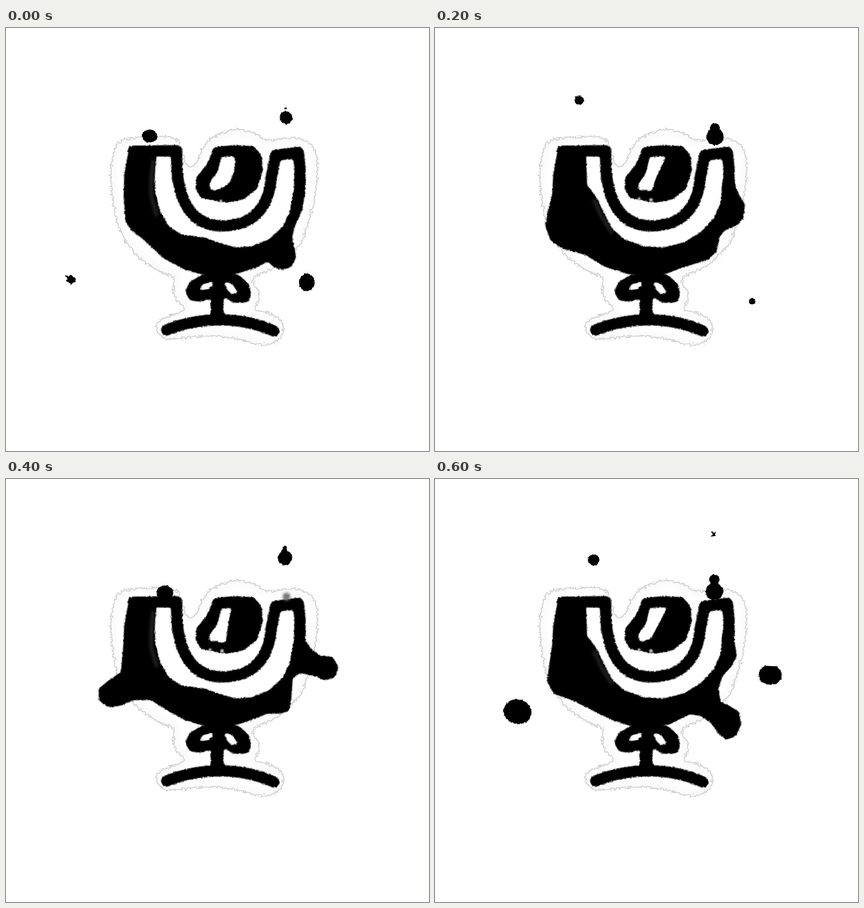
An HTML page without scripts for the animation above (0.8 s loop, 748x748 px).

```html
<!DOCTYPE html>
<html lang="en">
<head>
<meta charset="utf-8">
<title>Splashing cup</title>
<style>
  html, body { margin: 0; width: 100%; height: 100%; overflow: hidden; background: #fff; }
  svg { display: block; width: 100%; height: 100%; }
  .ink { filter: url(#ink); stroke: #000; stroke-width: 2; stroke-linejoin: round; }
  .drops { filter: url(#drop); stroke: #000; stroke-width: 1.5; stroke-linejoin: round; }
  .line { fill: none; stroke-width: 20; stroke-linecap: round; }
  .gap { fill: #fff; filter: url(#ink); }
  .notch { fill: #ccc; filter: blur(1px); }
  .sheen { fill: none; stroke: #1e1e1e; stroke-width: 7; stroke-linecap: round; filter: blur(2px); }
  .pose { opacity: 0; animation: show .8s step-end infinite; animation-delay: calc((var(--i) - 4) * .2s); }
  @keyframes show { 0% { opacity: 1; } 25%, 100% { opacity: 0; } }
</style>
</head>
<body>
<svg viewBox="0 0 748 748">
  <defs>
    <!-- rounds the corners, then roughens the edge -->
    <filter id="ink" filterUnits="userSpaceOnUse" x="0" y="0" width="748" height="748" color-interpolation-filters="sRGB">
      <feGaussianBlur stdDeviation="2.8"/>
      <feComponentTransfer result="soft"><feFuncA type="linear" slope="2.6" intercept="-.8"/></feComponentTransfer>
      <feTurbulence type="fractalNoise" baseFrequency=".25" numOctaves="2" seed="4" result="noise"/>
      <feDisplacementMap in="soft" in2="noise" scale="3.5" xChannelSelector="R" yChannelSelector="G"/>
    </filter>
    <filter id="drop" filterUnits="userSpaceOnUse" x="0" y="0" width="748" height="748" color-interpolation-filters="sRGB">
      <feTurbulence type="fractalNoise" baseFrequency=".25" numOctaves="2" seed="9" result="noise"/>
      <feDisplacementMap in="SourceGraphic" in2="noise" scale="3.5" xChannelSelector="R" yChannelSelector="G"/>
    </filter>
    <filter id="paper" filterUnits="userSpaceOnUse" x="0" y="0" width="748" height="748" color-interpolation-filters="sRGB">
      <feGaussianBlur stdDeviation="4"/>
      <feComponentTransfer result="soft"><feFuncA type="linear" slope="8" intercept="-3.5"/></feComponentTransfer>
      <feTurbulence type="fractalNoise" baseFrequency=".24" numOctaves="3" seed="2" result="noise"/>
      <feDisplacementMap in="soft" in2="noise" scale="10" xChannelSelector="R" yChannelSelector="G" result="shape"/>
      <feFlood flood-color="#c4c4c4"/>
      <feComposite in2="shape" operator="in" result="rim"/>
      <feMorphology in="shape" operator="erode" radius="1" result="inner"/>
      <feFlood flood-color="#fbfbfb"/>
      <feComposite in2="inner" operator="in" result="tint"/>
      <feMorphology in="shape" operator="erode" radius="9"/>
      <feGaussianBlur stdDeviation="4" result="core"/>
      <feFlood flood-color="#fff"/>
      <feComposite in2="core" operator="in" result="white"/>
      <feMerge>
        <feMergeNode in="rim"/><feMergeNode in="tint"/><feMergeNode in="white"/>
      </feMerge>
    </filter>
    <path id="sheenA" class="sheen" d="M260 236L257 268 257 298 266 330"/>
    <path id="sheenB" class="sheen" d="M282 306L295 334 312 361"/>
    <g id="notches" class="notch"><circle cx="382" cy="304" r="3"/><circle cx="361" cy="302" r="2.5"/></g>
  </defs>

  <path filter="url(#paper)" d="M207 196L245 192 290 191 306 199 313 222 322 247 336 240 345 215 360 195 385 183 410 178 438 184 455 196 470 199 490 194 520 194 543 207 552 232 551 270 545 310 535 345 525 378 512 392 490 415 465 430 437 442 437 452 449 465 447 485 437 498 460 502 484 512 493 530 488 548 470 560 445 561 410 551 375 545 340 546 305 550 280 551 266 538 264 522 275 513 300 505 320 496 300 482 294 462 298 441 270 431 235 408 212 380 196 345 187 300 184 260 188 225 195 204Z"/>

  <!-- glass, ice, bow and foot -->
  <g class="ink">
    <path class="line" d="M225 218L302 217C299 300 325 350 382 350S465 316 469 264L477 225 517 220 520 250 519 292"/>
    <path d="M371 211L405 208 438 210 451 226 453 252 443 284 420 302 390 308 365 304 345 299 336 284 338 264 352 247 362 230 366 215Z"/>
    <path d="M374 433L345 438 325 450 318 467 326 481 345 483 363 477 363 508 384 508 384 474 404 485 426 485 433 472 428 452 410 437Z"/>
    <path class="line" d="M284 534Q330 516 378 516 430 516 474 536"/>
  </g>
  <path class="gap" d="M342 464L346 454 365 448 366 456 356 462ZM385 449L400 452 410 468 400 471 391 463Z"/>

  <g class="pose" style="--i:0">
    <path class="ink" d="M219 210L210 260 209 300 212 342 222 357 242 372 280 407 320 428 360 438 400 436 440 424 463 412 474 422 488 427 504 422 512 405 509 388 505 370 510 350 523 322 528 290 509 288 503 325 490 352 465 375 435 387 405 389 375 380 350 371 310 366 288 352 272 325 263 290 262 260 266 215Z"/>
    <use href="#sheenA"/>
    <path class="gap" d="M381 228L404 227 406 238 402 258 395 274 380 284 366 288 359 281 363 268 374 255Z"/>
    <circle class="notch" cx="380" cy="306" r="2.5"/>
    <g class="drops">
      <ellipse cx="254" cy="191" rx="13" ry="10.500"/>
      <circle cx="495" cy="158.500" r="10.500"/>
      <circle cx="495" cy="142" r="1"/>
      <ellipse cx="532" cy="450" rx="13" ry="15"/>
      <path d="M105 438L111 441 114 437 118 440 123 444 122 449 117 449 116 453 111 449 107 447 110 444Z"/>
    </g>
  </g>

  <g class="pose" style="--i:1">
    <path class="ink" d="M219 210L210 260 208 295 200 325 196 350 205 375 225 389 265 400 300 421 340 434 375 438 405 435 440 422 482 409 497 395 502 370 512 357 535 347 545 335 547 312 535 292 527 268 509 270 506 310 493 338 470 362 440 380 405 389 370 387 335 375 312 355 298 328 285 300 268 278 266 215Z"/>
    <use href="#sheenB"/>
    <path class="gap" d="M380 228L409 227 400 245 391 264 384 287 377 289 371 285 365 288 359 285 360 276 373 256Z"/>
    <use href="#notches"/>
    <g class="drops">
      <circle cx="255" cy="127.500" r="7.500"/>
      <circle cx="495" cy="192" r="14.500"/>
      <circle cx="495" cy="177" r="8"/>
      <circle cx="561" cy="483" r="5"/>
    </g>
  </g>

  <g class="pose" style="--i:2">
    <path class="ink" d="M219 210L210 260 208 300 204 342 182 357 165 371 165 392 184 403 205 399 225 390 256 390 290 411 320 427 360 438 400 436 430 427 462 414 485 414 500 409 504 385 506 352 520 342 545 347 564 355 581 350 587 333 577 315 556 314 540 302 528 285 509 288 503 325 490 352 465 375 435 387 405 389 375 380 350 371 310 366 288 352 272 325 263 290 262 260 266 215Z"/>
    <use href="#sheenA"/>
    <path class="gap" d="M381 229L399 228 393 255 389 288 378 290 371 285 365 288 359 285 360 276 374 256Z"/>
    <use href="#notches"/>
    <circle cx="496" cy="208" r="7" fill="#777" style="filter:blur(2px)"/>
    <g class="drops">
      <ellipse cx="281" cy="201" rx="14" ry="12"/>
      <path d="M493 118L496 120 496 127 504 133 505 143 500 150 491 152 483 147 481 138 486 130Z"/>
    </g>
  </g>

  <g class="pose" style="--i:3">
    <path class="ink" d="M219 210L210 260 208 295 202 335 199 358 211 379 245 391 290 414 320 428 350 437 385 438 415 433 450 415 470 418 488 430 502 450 515 460 531 454 540 435 537 412 520 402 504 394 500 370 508 348 524 330 533 312 527 280 509 270 506 310 493 338 470 362 440 380 405 389 370 387 335 375 312 355 298 328 285 300 268 278 266 215Z"/>
    <use href="#sheenB"/>
    <path class="gap" d="M380 228L411 227 396 255 381 284 373 284 366 289 359 282 361 272 373 256Z"/>
    <use href="#notches"/>
    <g class="drops">
      <ellipse cx="280.500" cy="143" rx="9.500" ry="9"/>
      <path stroke="none" d="M488 92L493 95 497 93 495 98 498 101 493 101 489 102 490 97Z"/>
      <circle cx="494" cy="178" r="8.500"/>
      <circle cx="494" cy="199" r="14.500"/>
      <path d="M574 340L583 331 604 332 612 341 612 353 603 362 590 363 577 358 573 349Z"/>
      <ellipse cx="146" cy="411.500" rx="24" ry="21" transform="rotate(14 146 411.500)"/>
    </g>
  </g>
</svg>
</body>
</html>
```
